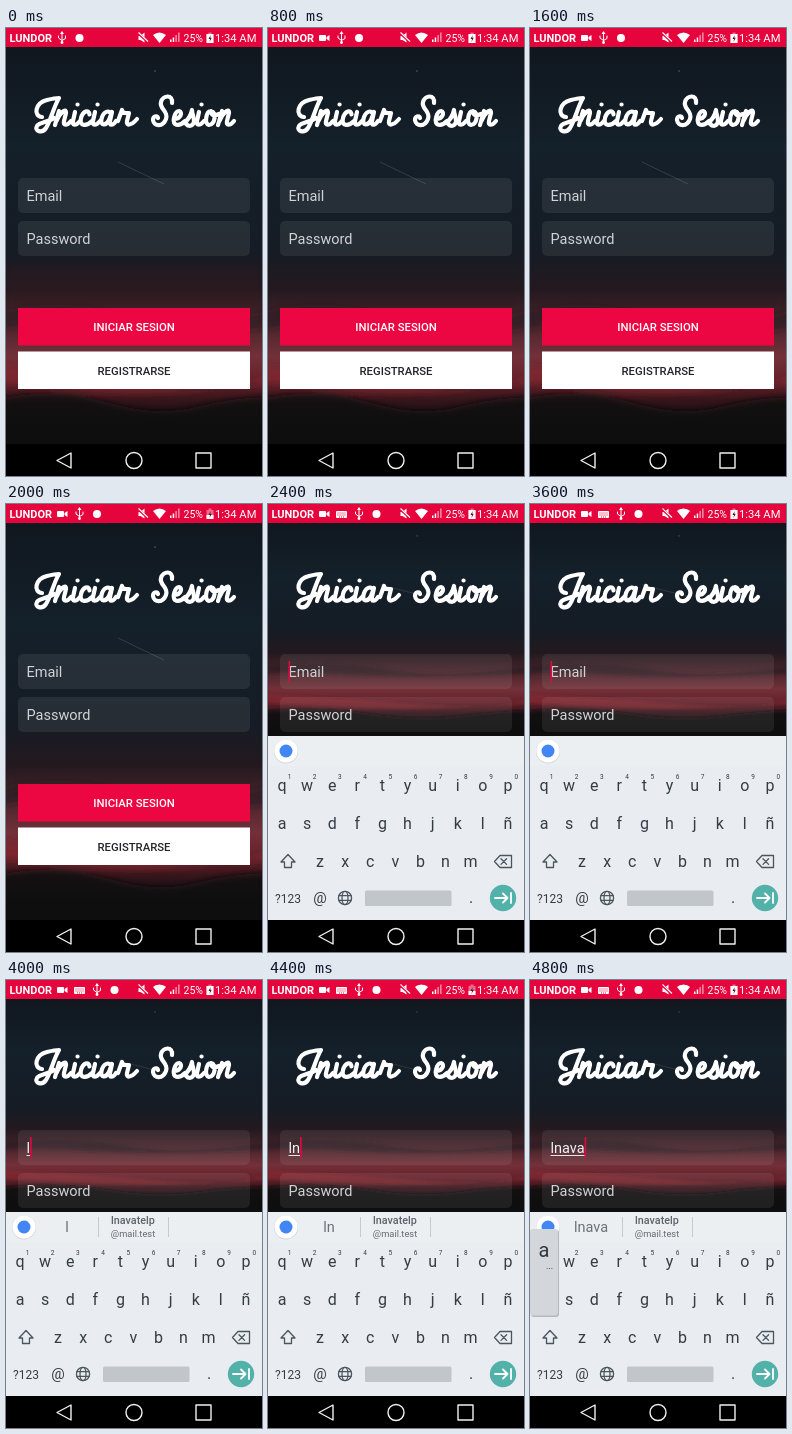
Animation of 256 by 448 pixels, one loop 5200 ms. Source, as an HTML page:

```html
<!DOCTYPE html>
<html lang="es">
<head>
<meta charset="utf-8">
<title>Iniciar Sesion</title>
<style>
  html, body { margin: 0; width: 100%; height: 100%; overflow: hidden; background: #000; }
  svg.stage { display: block; width: 100%; height: 100%; }
  text { font-family: Roboto, sans-serif; }
  .mid { text-anchor: middle; }
  .line { fill: none; stroke-linecap: round; stroke-linejoin: round; }
</style>
</head>
<body>
<svg class="stage" viewBox="0 0 256 448">
  <defs>
    <linearGradient id="sky" x2="0" y2="1">
      <stop offset="0" stop-color="#10171f"/>
      <stop offset=".25" stop-color="#14202a"/>
      <stop offset=".5" stop-color="#151c25"/>
      <stop offset=".61" stop-color="#21191f"/>
      <stop offset=".7" stop-color="#48262d"/>
      <stop offset=".78" stop-color="#733039"/>
      <stop offset=".84" stop-color="#65212a"/>
      <stop offset=".89" stop-color="#34151a"/>
      <stop offset=".94" stop-color="#130f14"/>
      <stop offset="1" stop-color="#0b0c11"/>
    </linearGradient>
    <filter id="soft" x="-20%" y="-50%" width="140%" height="200%"><feGaussianBlur stdDeviation="3"/></filter>
  </defs>

  <svg id="scene" y="19" width="256" height="397" viewBox="0 0 256 397" preserveAspectRatio="none">
    <rect width="256" height="397" fill="url(#sky)"/>
    <g filter="url(#soft)">
      <path d="M-10 268Q60 250 120 272T266 264V280Q150 292 70 282T-10 290Z" fill="#2a1c22" opacity=".7"/>
      <path d="M-10 318Q70 326 150 338T266 326V336Q150 352 80 344T-10 336Z" fill="#8a2a32" opacity=".55"/>
      <path d="M-10 352Q50 340 100 355T190 360T266 350V410H-10Z" fill="#110e13" opacity=".85"/>
    </g>
    <path d="M112 115L158 137" stroke="#6d7478" stroke-width=".9" opacity=".4"/>
    <circle cx="149" cy="24" r="1" fill="#59636b" opacity=".6"/>
    <rect id="glow" y="220" width="256" height="70" fill="#641a24" opacity=".12" filter="url(#soft)"/>
  </svg>

  <g id="title" class="line" stroke="#fff" stroke-width="4.2" role="img" aria-label="Iniciar Sesion"></g>

  <g fill="#fff" fill-opacity=".075">
    <rect x="12" y="150" width="232" height="35" rx="5"/>
    <rect x="12" y="193" width="232" height="35" rx="5"/>
  </g>
  <g font-size="14.5" fill="#d0d3d6">
    <text id="email" x="20.5" y="173">Email</text>
    <text x="20.5" y="216">Password</text>
  </g>
  <path id="underline" stroke="#e4e6e8" stroke-width="1"/>
  <rect id="cursor" y="157" width="1.6" height="21" fill="#e5063f"/>

  <g id="buttons" class="mid" font-size="11.3" font-weight="500">
    <rect x="12" y="280" width="232" height="37.5" fill="#ec0742"/>
    <text x="128" y="303" fill="#fff">INICIAR SESION</text>
    <rect x="12" y="323.5" width="232" height="37.5" fill="#fff"/>
    <text x="128" y="346.5" fill="#242428">REGISTRARSE</text>
  </g>

  <g id="keyboard">
    <rect y="232" width="256" height="184" fill="#e9ecf0"/>
    <rect y="232" width="256" height="30" fill="#eceff2"/>
    <circle cx="18" cy="247.5" r="12" fill="#cfd3d7"/>
    <circle cx="18" cy="247" r="11.6" fill="#fff"/>
    <circle cx="18" cy="247" r="6.5" fill="#4285f4"/>
    <g id="hints" class="mid">
      <path d="M92.5 237V257M162.5 237V257" stroke="#c5cacf"/>
      <text id="typed" x="61" y="252" font-size="14.5" fill="#697279"/>
      <text x="127" y="244" font-size="10.8" font-weight="500" fill="#5b646b">lnavatelp</text>
      <text x="127" y="256.5" font-size="9.3" fill="#626b72">@mail.test</text>
    </g>
    <g id="keys" class="mid" fill="#343d44"></g>
    <g class="line" stroke="#4b555c" stroke-width="1.3">
      <path d="M20 350.5L27 358H23.5V363.5H16.5V358H13Z"/>
      <path d="M232 351.5H243.5V363.5H232L226.5 357.5ZM233 354.8L238.6 360.4M238.6 354.8L233 360.4"/>
      <circle cx="77" cy="394" r="6.6"/>
      <ellipse cx="77" cy="394" rx="3" ry="6.6"/>
      <path d="M71 391.6H83M71 396.4H83"/>
    </g>
    <rect x="97" y="386.5" width="86.5" height="15.5" rx="1.5" fill="#c1c6ca"/>
    <circle cx="235" cy="394" r="13.2" fill="#52b1a8"/>
    <path d="M227 394H239M235 389.5L239.5 394L235 398.5M243 389V399" class="line" stroke="#fff" stroke-width="1.8"/>
    <g id="popup" class="mid" fill="#303940">
      <rect x="1" y="250" width="28" height="87" rx="3" fill="#b4b9be"/>
      <rect y="249" width="28" height="86.5" rx="3" fill="#d3d7db"/>
      <text x="14" y="277" font-size="20">a</text>
      <text x="19.5" y="289" font-size="9">...</text>
    </g>
  </g>

  <rect width="256" height="19" fill="#e6043d"/>
  <g fill="#fff">
    <text x="3.5" y="14" font-size="11" font-weight="700">LUNDOR</text>
    <g id="camera"><rect x="51" y="7" width="7" height="6" rx="1"/><path d="M58.5 9L61.5 7V13L58.5 11Z"/></g>
    <g id="keypad"><rect x="68" y="7" width="11" height="7" rx="1"/><path d="M69.5 9H78M69.5 11H78M71 13H76" stroke="#e6043d" stroke-dasharray="1 1"/></g>
    <g id="devices">
      <path d="M56 15V5M52.5 8V10L56 12.5L59.5 10.5V8" class="line" stroke="#fff"/>
      <path d="M56 3L58 6H54Z"/><circle cx="56" cy="14.5" r="1.4"/>
      <circle cx="73.5" cy="10" r="4"/>
    </g>
    <path d="M132.5 8H134.5L138.5 4.5V14.5L134.5 12H132.5Z"/>
    <path d="M132 5L142 14" stroke="#e6043d" stroke-width="2.4"/>
    <path d="M132.5 4.5L142 13.5" stroke="#fff" stroke-width="1.1"/>
    <path d="M147 7Q153.500 2 160 7L153.500 15Z"/>
    <path d="M164 14V11.500H165.500V14ZM166.700 14V9.500H168.200V14Z"/>
    <path d="M169.400 14V7H170.900V14ZM172.100 14V4.500H173.600V14Z" opacity=".55"/>
    <text x="177.500" y="14" font-size="10.5">25%</text>
    <path d="M202.500 4.500H205.500V6H207.500V15H200.500V6H202.500Z" opacity=".4"/>
    <rect id="charge" x="200.500" width="7"/>
    <path d="M204.700 7L202.500 11H204L203.500 14L205.700 9.800H204.200Z" fill="#4a1320"/>
    <text x="209" y="14" font-size="11.2">1:34 AM</text>
  </g>

  <rect y="416" width="256" height="32"/>
  <g class="line" stroke="#f1f1f1" stroke-width="1.4">
    <path d="M65 425V440L51 432.500Z"/>
    <circle cx="128" cy="432.500" r="8"/>
    <rect x="190" y="425" width="15" height="15"/>
  </g>
</svg>

<script>
const NS = "http://www.w3.org/2000/svg";
const $ = id => document.getElementById(id);
const add = (parent, tag, attrs, text = "") => {
  const node = document.createElementNS(NS, tag);
  for (const name in attrs) node.setAttribute(name, attrs[name]);
  node.textContent = text;
  return parent.appendChild(node);
};
const show = (id, on) => { $(id).style.display = on ? "" : "none"; };

// Brush strokes, one per letter, with the baseline at y = 0.
const strokes = {
  I: "M8-8C-1-9 1-22 13-25C17-26 21-27 25-27C20-19 17-5 12 3C8 9 0 6 3 1C6-3 15-3 20-7",
  n: "M0 0L4-14M1.500-4C5-12 11-18 11-12L9-4C8 1 12 1 16-4",
  i: "M3-13L1-4C0 1 4 1 8-4M5.500-20.500h.1",
  c: "M10.500-10.500C10-16 4-14 2-7C0 1 7 2 13-4",
  a: "M11-11C9-16 3-13 1.500-6C0 1 6 1 9-5L12-13L10-4C9 1 13 1 16-4",
  r: "M0-4L4-15C5-11 8-12 11-12L9-4C8 1 13 1 19-6",
  S: "M20-22C21-31 11-30 9-23C7-16 17-14 14-6C11 2 2 2 1-5C1-9 5-10 6-7",
  e: "M2-6C9-6 11-13 7-14C3-14 0-4 3-1C6 1 10-1 13-4",
  s: "M0-2C4-5 7-10 8-15C8-9 12-5 9-1C7 2 3 1 2-2",
  o: "M7-14C2-14 0-1 5 0C11 0 13-13 7-14C7-9 11-9 15-11"
};
const writeWord = (word, starts) => [...word].forEach((letter, i) =>
  add($("title"), "path", { d: strokes[letter], transform: `translate(${starts[i]} 97)` }));
writeWord("Iniciar", [28, 49, 66, 73, 86, 94, 112]);
writeWord("Sesion", [146, 166, 178, 190, 198, 212]);

const key = (label, x, y, size = 16) => add($("keys"), "text", { x, y, "font-size": size }, label);
const keyRow = (letters, x, y) => [...letters].forEach((letter, i) => key(letter, x + i * 25.1, y));
keyRow("qwertyuiop", 14, 287);
keyRow("asdfghjklñ", 14, 324.5);
keyRow("zxcvbnm", 52, 362.5);
[..."1234567890"].forEach((digit, i) => key(digit, 21.500 + i * 25.200, 275, 6.5));
key("?123", 20, 398.500, 12);
key("@", 52, 399, 15);
key(".", 203, 399);

const STEP = 400, LOOP = 5200;
const timeline = [
  { at: 0, icons: 0, glow: 1 },
  { at: 400, icons: 1 },
  { at: 2000, icons: 1, lowCharge: true },
  { at: 2400, icons: 2, keyboard: true, cursor: true },
  { at: 3200, icons: 2, keyboard: true },
  { at: 3600, icons: 2, keyboard: true, cursor: true },
  { at: 4000, icons: 2, keyboard: true, cursor: true, typed: "l" },
  { at: 4400, icons: 2, keyboard: true, cursor: true, typed: "ln", lowCharge: true },
  { at: 4800, icons: 2, keyboard: true, cursor: true, typed: "lnava", popup: true }
];

function render(time) {
  const { icons, glow = 0.3, keyboard, cursor, typed = "", popup, lowCharge } =
    timeline.findLast(state => state.at <= time);
  $("scene").setAttribute("height", keyboard ? 213 : 397);
  $("glow").style.opacity = glow * 0.12;
  show("keyboard", keyboard);
  show("buttons", !keyboard);
  show("cursor", cursor);
  show("hints", typed);
  show("popup", popup);
  show("camera", icons > 0);
  show("keypad", icons > 1);
  $("devices").setAttribute("transform", `translate(${icons * 17.5} 0)`);
  $("charge").setAttribute("y", lowCharge ? 11 : 6);
  $("charge").setAttribute("height", lowCharge ? 4 : 9);

  const email = $("email");
  email.textContent = typed || "Email";
  email.setAttribute("fill", typed ? "#f0f1f2" : "#d0d3d6");
  $("typed").textContent = typed;
  const end = 20.5 + (typed ? email.getComputedTextLength() : 0);
  $("cursor").setAttribute("x", end);
  $("underline").setAttribute("d", typed ? `M20.5 175.500H${end}` : "");
}

let shown = -1;
function tick() {
  const step = Math.floor((performance.now() % LOOP) / STEP);
  if (step !== shown) render((shown = step) * STEP);
  requestAnimationFrame(tick);
}
tick();
</script>
</body>
</html>
```
